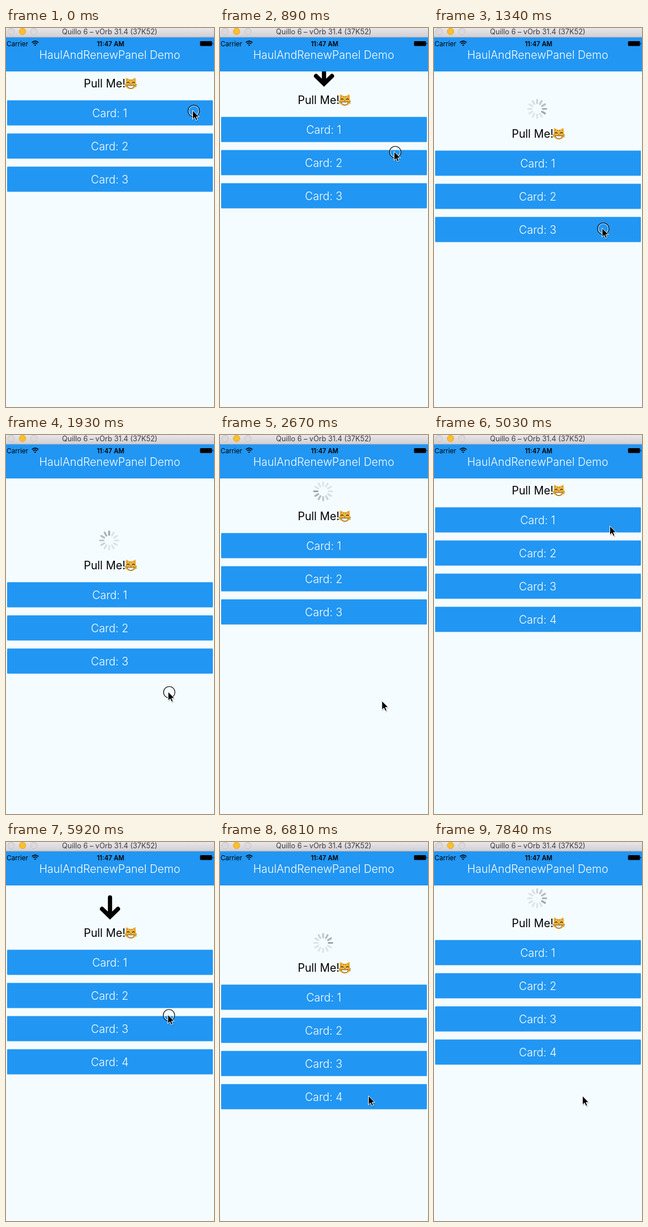
An HTML page that plays this animation: 365x663 px, repeating every 7.99 s.

```html
<!DOCTYPE html>
<html lang="en">
<head>
<meta charset="utf-8">
<title>Pull to refresh</title>
<style>
  html, body { margin: 0; width: 100%; height: 100%; overflow: hidden; background: #f5fcff; }
  svg { display: block; width: 365px; height: 663px; }
  text { font-family: Inter, "Open Sans", sans-serif; }
  .big { font-size: 19.4px; }
  .mid { text-anchor: middle; }
  .card rect { fill: #2196f3; }
  .card text { fill: #fff; font-weight: 300; }
</style>
</head>
<body>
<svg viewBox="0 0 365 663">
  <defs>
    <linearGradient id="chrome" x2="0" y2="1">
      <stop offset="0" stop-color="#e9e6e9"/>
      <stop offset="1" stop-color="#d2cfd3"/>
    </linearGradient>
  </defs>
  <rect width="365" height="663" fill="#f5fcff"/>

  <g id="page">
    <g transform="translate(182.5 53)">
      <path id="arrow" d="M0-18V14M-14 2L0 15.5L14 2" fill="none" stroke="#000" stroke-width="7.4" stroke-linecap="round"/>
    </g>
    <g id="spinner" transform="translate(181 53.5)" stroke-width="3.2" stroke-linecap="round"></g>
    <text class="big" x="136.5" y="104">Pull Me!</text>
    <g id="cat" transform="translate(219 97)">
      <path d="M-9-1L-8.5-10Q-5-9.5-2.5-7H2.5Q5-9.5 8.5-10L9-1Q11 2 9.5 5Q6 10 0 10T-9.5 5Q-11 2-9-1Z" fill="#f4b93c"/>
      <path d="M-7.4-4L-7.3-8L-4.5-6.4ZM7.4-4L7.3-8L4.5-6.4Z" fill="#c98a55"/>
      <path d="M-1.7-7V-4.5M1.7-7V-4.5" stroke="#a9742a" stroke-width="1.2"/>
      <path d="M-7-.5Q-5-4-2.5-.5M7-.5Q5-4 2.5-.5" fill="none" stroke="#43301c" stroke-width="1.5"/>
      <path d="M-6 3Q0 4.4 6 3Q5 8.7 0 8.7T-6 3Z" fill="#fff" stroke="#5a3c20" stroke-width=".9"/>
      <path d="M-1.4 .6H1.4L0 2.3Z" fill="#7b4a35"/>
      <path d="M-11 2L-7 2.6M-10.6 5.4L-7 4.6M11 2L7 2.6M10.6 5.4L7 4.6" stroke="#6e5325" stroke-width=".7"/>
    </g>
    <g id="cards"></g>
  </g>

  <rect y="16" width="365" height="60" fill="#2196f3"/>
  <text class="big mid" x="182" y="54" fill="#fff" font-weight="300">HaulAndRenewPanel Demo</text>
  <rect width="365" height="16" fill="url(#chrome)"/>
  <rect y="15.5" width="365" height="1" fill="#b5b4b8"/>
  <g stroke-width=".8">
    <circle cx="9" cy="6" r="5.8" fill="#dcd9dc" stroke="#c1bec2"/>
    <circle cx="29" cy="6" r="5.8" fill="#fdbe2d" stroke="#dfa023"/>
    <circle cx="49" cy="6" r="5.8" fill="#dcd9dc" stroke="#c1bec2"/>
  </g>
  <text class="mid" x="182" y="10.7" font-size="12.6" fill="#3c3b3d">Quillo 6 – vOrb 31.4 (37K52)</text>
  <text x="1" y="31.5" font-size="11.6">Carrier</text>
  <text class="mid" x="183.5" y="31.5" font-size="11.2" font-weight="600">11:47 AM</text>
  <g fill="none" stroke="#000" stroke-width="1.7">
    <path d="M45.5 25.4Q51.2 20.4 56.9 25.4M47.6 27.7Q51.2 24.7 54.8 27.7"/>
    <path d="M51.2 31.6L49.2 29.6Q51.2 28.2 53.2 29.6Z" fill="#000" stroke="none"/>
  </g>
  <rect x="340.5" y="22.9" width="21" height="8.7" rx="1.6"/>
  <path d="M362.6 25.5Q364.8 27.3 362.6 29Z"/>

  <g id="pointer">
    <g id="ring" fill="none">
      <circle cx="2" cy="1" r="9" stroke="#fff" stroke-width="1.2"/>
      <circle cx="2" cy="1" r="10" stroke="#000" stroke-width="1.2"/>
    </g>
    <path d="M1 2V18L4.6 14.4L7 20L9.8 18.8L7.5 13.4H12.2Z" opacity=".2"/>
    <path d="M0 0V15.8L3.6 12.4L6 17.8L8.6 16.7L6.3 11.4H11.2Z" stroke="#fff" stroke-width="1"/>
  </g>
</svg>
<script>
const LOOP = 7990, STEPS = 54, STEP = LOOP / STEPS;
const NS = "http://www.w3.org/2000/svg";
const $ = id => document.getElementById(id);

// [step, x, y] of the pointer tip
const POINTER = [
  [0, 327.5, 144], [4, 327.5, 144], [5, 316, 175], [6, 305.5, 216], [9, 295, 350],
  [12, 286, 439], [13, 284.5, 449], [15, 284, 465], [21, 284, 465], [25, 293.5, 395],
  [28, 299, 337], [34, 308.5, 159], [36, 308.5, 158], [37, 303, 186], [40, 284, 302],
  [43, 267, 408], [45, 260.5, 444]
];
// [step, distance the list is pulled down]
const PULL = [
  [4, 0], [5, 12], [6, 29], [9, 88], [12, 127], [13, 131], [15, 138], [16, 120], [17, 65],
  [18, 45], [27, 45], [28, 34], [29, 10], [30, 0], [36, 0], [37, 12], [40, 62], [43, 108],
  [45, 123], [46, 123], [47, 95], [48, 55], [49, 45]
];

function sample(table, k) {
  const i = table.findIndex(row => row[0] > k);
  if (i < 0) return table[table.length - 1].slice(1);
  if (i === 0) return table[0].slice(1);
  const a = table[i - 1], b = table[i], u = (k - a[0]) / (b[0] - a[0]);
  return a.slice(1).map((v, j) => v + (b[j + 1] - v) * u);
}

function add(parent, tag, attrs, text) {
  const el = document.createElementNS(NS, tag);
  for (const name in attrs) el.setAttribute(name, attrs[name]);
  if (text) el.textContent = text;
  return parent.appendChild(el);
}

const cards = [1, 2, 3, 4].map(n => {
  const y = 126.5 + (n - 1) * 58;
  const g = add($("cards"), "g", { class: "card" });
  add(g, "rect", { x: 2, y, width: 361, height: 44, rx: 1 });
  add(g, "text", { x: 182, y: y + 29.5, class: "big mid" }, "Card: " + n);
  return g;
});

const spokes = Array.from({ length: 12 }, (_, i) =>
  add($("spinner"), "path", { d: "M0-9.8V-16", transform: `rotate(${i * 30})`, stroke: "#777b7e" }));

const show = (el, on) => el.setAttribute("visibility", on ? "visible" : "hidden");
const move = (el, x, y) => el.setAttribute("transform", `translate(${x} ${y})`);

function draw(k) {
  const [x, y] = sample(POINTER, k);
  const [pull] = sample(PULL, k);
  const loading = (k >= 9 && k < 30) || k >= 41;
  move($("pointer"), x, y);
  move($("page"), 0, Math.round(pull));
  show($("ring"), k < 16 || (k >= 35 && k < 46));
  show($("arrow"), !loading);
  show($("spinner"), loading);
  show(cards[3], k >= 29);

  const lead = Math.floor((k * STEP - 1920) * 0.01298);
  spokes.forEach((s, i) => {
    const age = (((lead - i) % 12) + 12) % 12;
    s.setAttribute("stroke-opacity", Math.max(0.18, 0.68 - age * 0.09));
  });
}

function tick() {
  const t = performance.now() % LOOP;
  draw(Math.floor(t / STEP + 0.03) % STEPS);
  requestAnimationFrame(tick);
}
tick();
</script>
</body>
</html>
```
